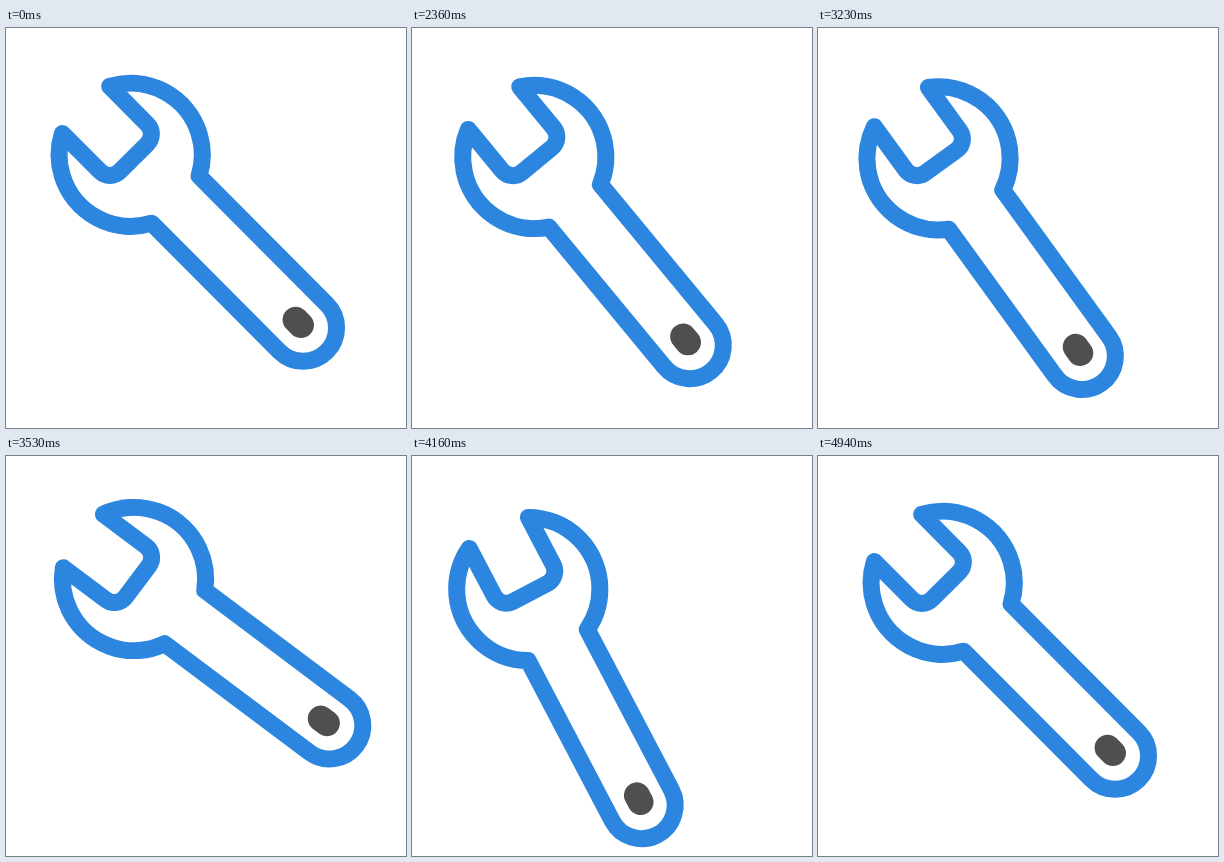
Animation, 400 px wide and 400 px high, one loop 4.97 s. Source, as an HTML page with a canvas:

```html
<!DOCTYPE html>
<html lang="en">
<head>
<meta charset="utf-8">
<title>Turning wrench</title>
<style>
  html, body { margin: 0; width: 100%; height: 100%; overflow: hidden; background: #fff; }
  canvas { display: block; width: 400px; height: 400px; }
</style>
</head>
<body>
<canvas id="stage" width="400" height="400"></canvas>
<script>
const ctx = document.getElementById('stage').getContext('2d');
const LOOP = 4970;
const STEP = 30;
const START = 2000;
const BLUE = '#2c85de';
const GREY = '#4f4f4f';

// [time in ms, turn in degrees, skew of the easing into this key]
const KEYS = [
  [2000, 0, 1],
  [2200, 24, 1],
  [2740, -10, 0.52],
  [2765, -10, 1],
  [3010, 24, 1],
  [3660, -10, 0.71],
  [4042, 24, 1.19],
  [4442, -10, 1],
  [4940, 0, 0.77]
];

const ease = x => Math.sin(x * Math.PI / 2) ** 2;

function turnAt(t) {
  const i = KEYS.findIndex(k => k[0] > t);
  if (i < 1) return 0;
  const [t0, a0] = KEYS[i - 1];
  const [t1, a1, skew] = KEYS[i];
  return a0 + (a1 - a0) * ease(((t - t0) / (t1 - t0)) ** skew);
}

// The wrench lies along the x axis with its head centred on the origin.
function wrench() {
  const head = 71.6, half = 33.4, end = 244.3, slot = 4, corner = 14;
  const gap = Math.asin(half / head);
  const reach = head * Math.cos(gap);

  ctx.beginPath();
  ctx.arc(0, 0, head, Math.PI + gap, 2 * Math.PI - gap);
  ctx.arc(end, 0, half, -Math.PI / 2, Math.PI / 2);
  ctx.arc(0, 0, head, gap, Math.PI - gap);
  ctx.arcTo(slot, half, slot, -half, corner);
  ctx.arcTo(slot, -half, -reach, -half, corner);
  ctx.closePath();
  ctx.lineJoin = 'round';
  ctx.lineWidth = 17;
  ctx.strokeStyle = BLUE;
  ctx.stroke();

  ctx.beginPath();
  ctx.moveTo(233.2, -0.4);
  ctx.lineTo(240.8, -0.4);
  ctx.lineCap = 'round';
  ctx.lineWidth = 26;
  ctx.strokeStyle = GREY;
  ctx.stroke();
}

function draw(now) {
  const t = now % LOOP;
  const held = START + Math.floor((t - START) / STEP) * STEP;
  ctx.fillStyle = '#fff';
  ctx.fillRect(0, 0, 400, 400);
  ctx.save();
  ctx.translate(100, 102);
  ctx.rotate((45.1 + turnAt(held)) * Math.PI / 180);
  ctx.translate(35, 0);
  wrench();
  ctx.restore();
  requestAnimationFrame(draw);
}

draw(0);
</script>
</body>
</html>
```
